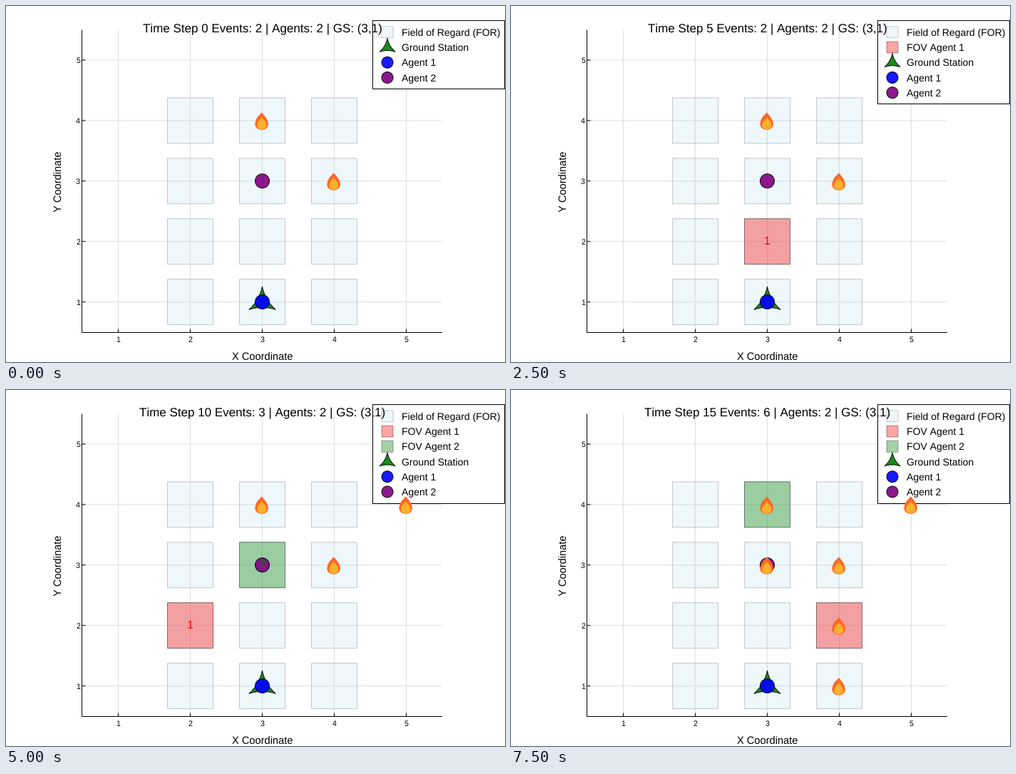
Write a matplotlib script that moves like this. It is 700 px wide and 500 px high and loops after 8 s.

```python
import matplotlib.pyplot as plt
import numpy as np
from matplotlib.animation import FuncAnimation
from matplotlib.patches import Circle, PathPatch, Polygon, Rectangle
from matplotlib.path import Path

W, H, DPI = 700, 500, 100
PT = 72 / DPI  # points per pixel
STEPS, INTERVAL = 16, 500
LEFT, RIGHT, TOP, BOTTOM = 106.5, 611.5, 33.5, 458.5

plt.rcParams["font.family"] = "Liberation Sans"
plt.rcParams["text.hinting"] = "none"
plt.rcParams["text.kerning_factor"] = 6

GREEN, BLUE, PURPLE = (0, 0.5, 0), (0, 0, 1), (0.5, 0, 0.5)
LIGHT_BLUE, RED = (0.678, 0.847, 0.902), (1, 0, 0)

# (first step, x, y)
FIRES = [(0, 3, 4), (0, 4, 3), (10, 5, 4), (11, 4, 1), (12, 4, 2), (14, 3, 3)]
# Cells observed by each agent, known from its downlink step onwards
FOV_1 = [(5, 3, 2), (10, 2, 2), (15, 4, 2)]
FOV_2 = [(7, 3, 3), (12, 3, 4)]

fig = plt.figure(figsize=(W / DPI, H / DPI), dpi=DPI, facecolor="white")
ax = fig.add_axes([0, 0, 1, 1])


def px(x):
    return 56.5 + 101 * x


def py(y):
    return 500.55 - 84.92 * y


def add(patch):
    patch.set(zorder=1, snap=False)
    ax.add_patch(patch)


def style(color, alpha):
    return dict(fc=(*color, alpha), ec=(0, 0, 0, alpha), lw=PT)


def line(xs, ys, color="black"):
    ax.plot(xs, ys, color=color, lw=PT, zorder=1, snap=False,
            solid_capstyle="butt")


def text(x, y, s, size, ha="center", **kw):
    ax.text(x, y, s, fontsize=size * PT, ha=ha, va="baseline", zorder=1, **kw)


def square(x, y, half, color, alpha):
    add(Rectangle((x - half, y - half), 2 * half, 2 * half,
                  **style(color, alpha)))


def disc(x, y, r, color):
    add(Circle((x, y), r, **style(color, 0.9)))


def station(x, y, r):
    """Equilateral triangle with sides bent inwards."""
    angles = np.pi * (0.5 + np.arange(4) * 2 / 3)
    corners = 1.6 * np.column_stack([np.cos(angles), -np.sin(angles)])
    verts = [corners[0]]
    for a, b in zip(corners, corners[1:]):
        verts += [(a + b) / 2 * 0.38, b]
    verts = np.array(verts + [corners[0]]) * r + (x, y)
    codes = [Path.MOVETO] + [Path.CURVE3] * 6 + [Path.CLOSEPOLY]
    add(PathPatch(Path(verts, codes), joinstyle="bevel", **style(GREEN, 0.9)))


def drop(x, top, bottom, half, color):
    """Teardrop with its tip at the top."""
    t = np.linspace(0, 2 * np.pi, 60)
    xs = x + half * np.sin(t) * np.sin(t / 2) / 0.77
    ys = top + (bottom - top) * (1 - np.cos(t)) / 2
    add(Polygon(np.column_stack([xs, ys]), fc=color, ec="none"))


def fire(x, y):
    drop(x - 5.5, y - 6.7, y + 10.5, 4.4, "#ff6723")
    drop(x - 0.8, y - 11.3, y + 13, 9.1, "#ff6723")
    drop(x - 0.8, y - 4.3, y + 12.2, 6.6, "#ffb02e")


def orbit_row(step):
    return round(1 + 0.8 * (step % 5))


def latest(log, step):
    seen = [cell for start, *cell in log if start <= step]
    return seen[-1] if seen else None


def draw_axes():
    for k in range(1, 6):
        line([px(k)] * 2, [TOP, BOTTOM], "#dedede")
        line([LEFT, RIGHT], [py(k)] * 2, "#dedede")
    line([LEFT, LEFT, RIGHT + 0.5], [TOP, BOTTOM, BOTTOM])
    for k in range(1, 6):
        line([px(k)] * 2, [BOTTOM, BOTTOM - 5])
        line([LEFT, LEFT + 5], [py(k)] * 2)
        text(px(k), 472, str(k), 10.67)
        text(104, py(k) + 4.2, str(k), 10.67, "right")
    text(359.5, 498, "X Coordinate", 14.67)
    text(79, 246, "Y Coordinate", 14.67, rotation=90, rotation_mode="anchor")


def draw_legend(fovs):
    items = [("Field of Regard (FOR)",
              lambda x, y: square(x, y, 8, LIGHT_BLUE, 0.2))]
    for n, cell, color in fovs:
        if cell:
            items.append((f"FOV Agent {n}",
                          lambda x, y, c=color: square(x, y, 8, c, 0.35)))
    items += [("Ground Station", lambda x, y: station(x, y, 8)),
              ("Agent 1", lambda x, y: disc(x, y, 8, BLUE)),
              ("Agent 2", lambda x, y: disc(x, y, 8, PURPLE))]
    height = round(21.25 * len(items) + 11.2)
    add(Rectangle((514.5, 20.5), 185, height, fc="white", ec="black", lw=PT))
    for i, (label, mark) in enumerate(items):
        y = 36.75 + 21.25 * i
        mark(535, y)
        text(555, round(y + 5.2), label, 14, "left")


def draw(step):
    ax.clear()
    ax.set(xlim=(0, W), ylim=(H, 0))
    ax.axis("off")
    draw_axes()

    rows = [orbit_row(step), orbit_row(step + 3)]
    for y in range(1, 6):
        if any(abs(y - r) <= 1 for r in rows):
            for x in (2, 3, 4):
                square(px(x), py(y), 32, LIGHT_BLUE, 0.2)

    fovs = [(1, latest(FOV_1, step), RED), (2, latest(FOV_2, step), GREEN)]
    for _, cell, color in fovs:
        if cell:
            square(px(cell[0]), py(cell[1]), 32, color, 0.35)

    station(px(3), py(1), 13.5)
    for row, color in zip(rows, (BLUE, PURPLE)):
        disc(px(3), py(row), 10, color)

    draw_legend(fovs)
    fires = [cell for start, *cell in FIRES if start <= step]
    text(360, 36, f"Time Step {step} Events: {len(fires)} | Agents: 2 "
                  "| GS: (3,1)", 17)
    for n, cell, color in fovs:
        if cell:
            text(px(cell[0]), py(cell[1]) + 4.5, str(n), 16, color=color)
    for x, y in fires:
        fire(px(x), py(y))


anim = FuncAnimation(fig, draw, frames=STEPS, interval=INTERVAL,
                     init_func=lambda: None, repeat=True, repeat_delay=0)
plt.show()
```
